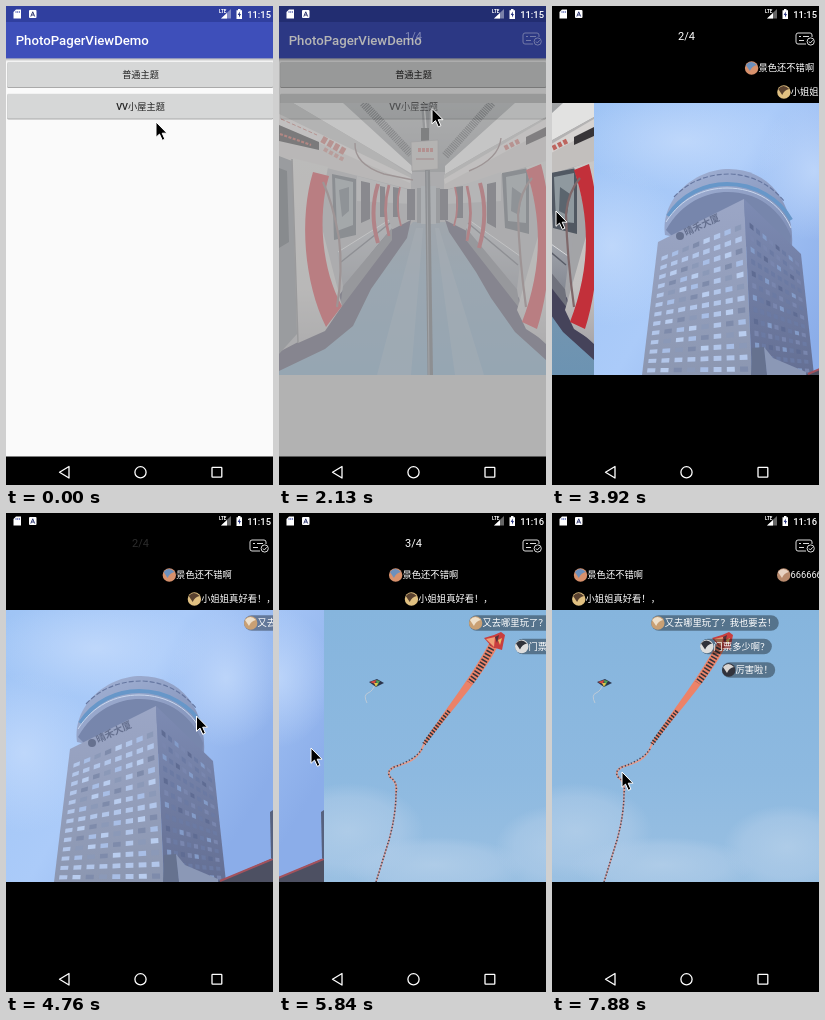
Recreate the animation shown at these times as an HTML page. Size 267 by 479 pixels, loop 8 s.

```html
<!DOCTYPE html>
<html lang="zh">
<head>
<meta charset="utf-8">
<title>PhotoPagerViewDemo</title>
<style>
html, body { margin: 0; width: 100%; height: 100%; overflow: hidden; background: #000; }
#stage { display: block; width: 100vw; height: 100vh; }
text { font-family: Roboto, "Noto Sans CJK SC", "Noto Sans CJK", sans-serif; }
</style>
</head>
<body>
<svg id="stage" viewBox="0 0 267 479">
  <defs>
    <linearGradient id="drop" x2="0" y2="1"><stop stop-color="#777" stop-opacity=".55"/><stop offset="1" stop-color="#aaa" stop-opacity="0"/></linearGradient>
    <linearGradient id="floor" x2="0" y2="1"><stop stop-color="#8494a4"/><stop offset=".35" stop-color="#7896ae"/><stop offset="1" stop-color="#6c93b2"/></linearGradient>
    <linearGradient id="ceil" x2="0" y2="1"><stop stop-color="#a2a4a6"/><stop offset="1" stop-color="#85888c"/></linearGradient>
    <linearGradient id="panel" x2="0" y2="1"><stop stop-color="#c9c7c5"/><stop offset=".7" stop-color="#c3c1c0"/><stop offset="1" stop-color="#a9a7aa"/></linearGradient>
    <linearGradient id="seat" x2="0" y2="1"><stop stop-color="#aeb1b7"/><stop offset="1" stop-color="#858993"/></linearGradient>
    <linearGradient id="skyA" x2="1" y2=".6"><stop stop-color="#9fc4f5"/><stop offset=".5" stop-color="#abcbf9"/><stop offset="1" stop-color="#8bade9"/></linearGradient>
    <linearGradient id="skyB" x2="0" y2="1"><stop stop-color="#86b5dd"/><stop offset=".6" stop-color="#8db9e0"/><stop offset="1" stop-color="#9ac0e2"/></linearGradient>
    <linearGradient id="front" x2="0" y2="1"><stop stop-color="#9ba6c6"/><stop offset="1" stop-color="#8c97b1"/></linearGradient>
    <linearGradient id="side" x2="0" y2="1"><stop stop-color="#7d8bb3"/><stop offset="1" stop-color="#646f93"/></linearGradient>
    <linearGradient id="drum" y2="1"><stop stop-color="#a3b3d6"/><stop offset="1" stop-color="#7d8cb4"/></linearGradient>
    <radialGradient id="cloud"><stop stop-color="#c6dcfc" stop-opacity=".75"/><stop offset="1" stop-color="#c6dcfd" stop-opacity="0"/></radialGradient>
    <radialGradient id="haze"><stop stop-color="#b4cfe9" stop-opacity=".8"/><stop offset=".7" stop-color="#aecbe8" stop-opacity=".55"/><stop offset="1" stop-color="#aecbe8" stop-opacity="0"/></radialGradient>
  </defs>

  <g id="home">
    <path fill="#fafafa" d="M0 0H267V451H0Z"/>
    <path fill="#303f9f" d="M0 0H267V16H0Z"/>
    <path fill="#3e4fba" d="M0 16H267V52.5H0Z"/>
    <path fill="url(#drop)" d="M0 52.5H267V56H0Z"/>
    <text x="9.7" y="39" font-size="13.2" font-weight="500" fill="#fff">PhotoPagerViewDemo</text>
    <g fill="#aaa"><rect x="1.2" y="56.8" width="266" height="25.2" rx="1.3"/><rect x="1.2" y="88.6" width="266" height="25" rx="1.3"/></g>
    <g fill="#d6d7d7"><rect x="1.2" y="56" width="266" height="25" rx="1.3"/><rect x="1.2" y="87.8" width="266" height="24.8" rx="1.3"/></g>
    <g font-size="9.2" font-weight="500" fill="#222" text-anchor="middle"><text x="134.5" y="72">普通主题</text><text x="134.5" y="103.5">VV小屋主题</text></g>
  </g>

  <path id="shade" d="M0 0H267V451H0Z"/>
  <g id="viewer">
    <svg class="page" y="97" width="267" height="272" viewBox="0 97 267 272">
      <path fill="#a3a4a7" d="M0 97H267V369H0Z"/>
      <path fill="url(#ceil)" d="M62 97H238L166 166H132Z"/>
      <path fill="#e2e2e1" d="M14 97H64L133 160V168L100 148ZM267 97H236L166 160V168L204 146 267 111Z"/>
      <path fill="#b4b3b3" d="M0 97H14L100 148 132 169V175L0 112ZM267 111L204 146 165 169V176L267 119Z"/>
      <g fill="none" stroke="#4c4f53" stroke-width="8" stroke-dasharray="1.2 .9"><path d="M84 97L132 148"/><path d="M213 97L166 150"/></g>
      <path fill="#c2bfbd" d="M0 108L132 172V186L48 163 0 152ZM267 113L165 173V186L250 160 267 156Z"/>
      <path fill="#d6d3d1" d="M0 108L132 172 131 177 0 119ZM267 113L165 173 166 178 267 124Z"/>
      <path fill="#29272a" d="M0 119L40 136V144L0 135Z"/>
      <path stroke="#b4473d" stroke-width="2" stroke-dasharray="3 1.5" d="M1 128L32 139"/>
      <path fill="none" stroke="#b9655f" stroke-width="1" stroke-dasharray="4 2" d="M2 113L38 129"/>
      <path fill="none" stroke="#bd655f" stroke-width="7" stroke-dasharray="5 2" d="M43 133L66 146"/>
      <path fill="none" stroke="#c07d78" stroke-width="4" stroke-dasharray="4 2" d="M45 143L65 154"/>
      <path fill="#373437" d="M267 121L247 131V139L267 130Z"/>
      <path stroke="#bd655f" stroke-width="5" stroke-dasharray="4 2" d="M240 135L224 143"/>
      <path fill="#a3a4a8" d="M48 162L134 184V220L62 300ZM252 160L166 184V220L240 300Z"/>
      <path fill="#b9babc" d="M78 170L134 185V198L78 195ZM222 166L166 185V198L222 195Z"/>
      <path fill="#515862" d="M53 168L77 173V229L55 234ZM223 167L250 162V228L226 222Z"/>
      <path fill="#8f999f" d="M56 172L74 176V219L58 225ZM227 171L247 167V217L229 215Z"/>
      <g fill="#5b656e"><path d="M60 184L70 181V205L63 211ZM233 181L243 188 240 209 232 205Z"/></g>
      <path fill="#4c4d58" d="M82 175L91 177V213L82 217ZM101 180L106 181V211H101ZM114 181L120 182V211H114ZM128 183H136V214H128ZM161 183H169V214H161ZM177 181L184 180V212H177ZM208 178L217 176V222L208 217Z"/>
      <path fill="url(#floor)" d="M134 216H166L267 349V369H0V360Z"/>
      <g fill="#a3b2be" opacity=".35"><path d="M137 222L144 222 132 369H98Z"/><path d="M156 222L160 222 205 369H176Z"/></g>
      <path fill="#45435a" d="M132 214L108 226 58 292 42 324 0 346V365L46 343 74 320 92 283 128 232ZM166 214L190 226 240 292 247 320 267 338V354L236 326 212 292 197 266 170 226Z"/>
      <path fill="url(#seat)" d="M58 246L110 214 113 222 64 280ZM242 250L190 214 187 222 238 283Z"/>
      <path fill="#6f717c" d="M64 280L113 222V234L61 303ZM238 283L187 222V234L241 303Z"/>
      <path fill="none" stroke="#d9dadc" d="M59 246L110 214M241 250L190 214"/>
      <path fill="none" stroke="#5a5d68" stroke-width="1.500" d="M62 256L111 217M239 259L189 217"/>
      <path fill="#777b82" d="M0 150L13 155 18 328 0 348Z"/>
      <path fill="#495058" d="M0 162L8 165 10 236 0 242Z"/>
      <path fill="url(#panel)" d="M13 152L49 161 40 210 63 300 46 325 19 337Z"/>
      <path fill="url(#panel)" d="M267 155L247 161 262 220 238 304 247 323 267 336Z"/>
      <path fill="none" stroke="#76777b" stroke-width="1.500" d="M13 153L19 337"/>
      <path fill="#c2303a" d="M34 166L50 170C38 210 43 264 63 300L47 321C25 276 20 212 34 166Z"/>
      <path fill="#c2303a" d="M247 164L262 158C275 205 274 272 258 323L243 316C263 264 264 214 247 164Z"/>
      <g fill="none" stroke="#b03d46"><path stroke-width="4" d="M99 178Q90 207 99 237M201 177Q210 208 200 242"/><path stroke-width="2.8" d="M110 179Q103 204 110 230M188 180Q195 206 188 235"/><path stroke-width="1.8" d="M121 181Q116 200 122 220M176 181Q181 200 175 220"/></g>
      <g fill="none" stroke="#7f686a" stroke-width="2.2"><path d="M44 176Q54 198 60 232Q64 264 58 301M253 172Q241 186 239 208Q240 250 247 301"/><path stroke-width="1.4" d="M76 137Q75 158 105 168L134 174M222 132Q220 153 190 165"/></g>
      <path fill="#6c6e73" d="M142 97H151L150 136H145Z"/><path stroke="#c5c6c7" stroke-width="1.500" d="M145 97L147 122"/>
      <path fill="#777a82" d="M138 182H161V217H138Z"/>
      <path fill="#a4abb2" d="M142 180H157V218H142Z"/>
      <path fill="#343539" d="M142 122H150V135H142Z"/>
      <path fill="#b7b3b1" stroke="#858587" stroke-width=".7" d="M132 136L159 134V163L133 165Z"/>
      <path stroke="#b35f5c" stroke-width="4" stroke-dasharray="3 1" d="M139 144H154"/><path stroke="#a3817f" stroke-width="2" d="M137 153H155"/>
      <path fill="#555a63" d="M146 164H151L154 369H148.500Z"/><path stroke="#8b9199" d="M148 165L150 369"/>
    </svg>

    <svg class="page" y="97" width="267" height="272" viewBox="0 97 267 272">
      <path fill="url(#skyA)" d="M0 97H267V369H0Z"/>
      <g fill="url(#cloud)"><ellipse cx="90" cy="135" rx="110" ry="50"/><ellipse cx="18" cy="240" rx="72" ry="80"/><ellipse cx="220" cy="165" rx="56" ry="70"/></g>
      <path fill="url(#drum)" d="M71 229C66 194 99 163 135 163C174 163 201 196 198 242L180 244 90 233Z"/>
      <path fill="#7786ac" d="M72 224C88 196 112 186 134 186C162 186 186 202 197 230L196 243 150 210 84 236Z"/>
      <path fill="none" stroke="#6797c9" stroke-width="4" d="M74 210C88 188 111 178 133 178C161 178 186 193 197 214"/>
      <path fill="none" stroke="#c9d7ee" d="M72 216C87 192 110 182 133 182C161 182 186 196 197 222"/>
      <path fill="none" stroke="#6677a1" stroke-width="1.200" stroke-dasharray="5 2" d="M80 191C97 173 117 168 137 168C158 169 177 179 190 195"/>
      <path fill="url(#front)" d="M64 236L150 193 158 369H48Z"/>
      <path fill="url(#side)" d="M150 193L207 248 220 369H158Z"/>
      <g id="panes"></g>
      <circle cx="86" cy="230" r="4" fill="#66718f"/>
      <text x="92" y="230" font-size="9.500" font-weight="700" fill="#65708f" transform="rotate(-25 92 230)">晴禾大厦</text>
      <path fill="#66728f" d="M158 342L170 341 173 369H157Z"/><path fill="#8b98b6" d="M170 341L179 352 212 366V369H173Z"/>
      <path fill="#4d5062" d="M212 369L267 345V369Z"/><path stroke="#a3525d" stroke-width="2" d="M214 368L267 346"/>
      <path fill="#56617e" d="M264 299L267 297V346L265 345Z"/>
    </svg>

    <svg class="page" y="97" width="267" height="272" viewBox="0 97 267 272">
      <path fill="url(#skyB)" d="M0 97H267V369H0Z"/>
      <g fill="url(#haze)"><ellipse cx="24" cy="318" rx="76" ry="48"/><ellipse cx="110" cy="352" rx="92" ry="28"/><ellipse cx="235" cy="334" rx="64" ry="42"/></g>
      <path fill="none" stroke="#c9ced5" stroke-width=".8" d="M51 171Q49 178 44 180T43 190"/>
      <path fill="#2b344b" d="M45 169L53 166 60 170 52 174Z"/><path fill="#d54d41" d="M46 169L52 167 51 171Z"/><path fill="#54a05a" d="M52 167L56 168 53 173Z"/><path fill="#e2c34b" d="M50 170L54 170 52 174Z"/>
      <path fill="#ec8268" d="M167 127L175 131C158 164 135 188 101 232L99 230C123 194 147 165 167 127Z"/>
      <g fill="none" stroke="#33343c"><path stroke-width="6.500" stroke-dasharray="1.6 1.8" d="M169 132Q158 153 146 170"/><path stroke-width="4" stroke-dasharray="1.5 1.6" d="M125 198Q112 214 100 231"/></g>
      <g fill="none"><path stroke="#e39a8c" stroke-width="2" d="M100 231Q96 242 88 247Q81 251 70 254Q62 258 66 264Q74 269 72 280"/><path stroke="#d59a98" stroke-width="1.500" d="M72 280Q72 302 65 327L52 369"/><path stroke="#40475a" stroke-width="1.500" stroke-dasharray="1.3 2" d="M98 236Q92 246 70 254Q62 258 66 264Q74 269 72 280Q72 302 65 327L52 369"/></g>
      <path fill="#c93e3e" d="M160 125L170 122 177 119 181 122 178 137 168 134Z"/>
      <path fill="#f0a078" d="M162 126L171 124 170 134Z"/><path fill="#54323a" d="M171 124L175 122 173 130Z"/><path fill="#e7bf65" d="M174 127L178 125 176 132Z"/>
    </svg>

    <g id="bullets"></g>
    <text id="count" x="134.5" y="34" font-size="11" fill="#fff" text-anchor="middle"></text>
    <g fill="none" stroke="#ddd"><path d="M254 38H246Q244 38 244 36V29Q244 27 246 27H258Q260 27 260 29V31"/><path d="M247 30.500H249M251 30.500H257M247 34.500H252"/><circle cx="258.700" cy="35.500" r="3.600"/><path d="M257 35.500L258.300 37 260.700 34.300"/></g>
  </g>

  <g fill="#fff">
    <path d="M10 3.500H15V12.500H7.500V6Z"/><path stroke="#5362b0" stroke-width=".8" d="M10 5V7M11.700 5V7M13.400 5V7"/>
    <rect x="23" y="4" width="7.500" height="8" rx="1"/><path fill="none" stroke="#222b66" stroke-width=".9" d="M24.800 10.500L26.750 5.800 28.700 10.500M25.500 9H28"/>
    <path opacity=".4" d="M225 3V12.500H215Z"/><path d="M221 7V12.500H215Z"/><text x="213" y="7" font-size="4.600" font-weight="700">LTE</text>
    <path d="M230.500 4.200H232V3H234.500V4.200H236V13H230.500Z"/><path fill="#28347f" d="M233.800 5.500L231.700 9H233V11.500L235 8H233.800Z"/>
    <text id="clock" x="265" y="11.700" font-size="9.400" font-weight="500" text-anchor="end"></text>
  </g>
  <path d="M0 450.500H267V479H0Z"/>
  <g fill="none" stroke="#fff" stroke-width="1.300"><path stroke-linejoin="round" d="M63 460.500V472L53.500 466.250Z"/><circle cx="134.500" cy="466.300" r="5.600"/><rect x="206" y="461.300" width="9.800" height="9.800" rx=".6"/></g>
  <path id="cursor" stroke="#fff" stroke-width="1" d="M0 0V15.300L3.500 12.100 6.300 18.300 8.900 17.200 6.200 11.200H11Z"/>
</svg>
<script>
const $ = id => document.getElementById(id);
const pages = [...document.querySelectorAll('.page')];
const LOOP = 8000, W = 267;

// text, centre y, x at time at, speed in px/ms, avatar tones
const bullets = [
  ['景色还不错啊', 62, 224, 3200, .0432, '#d8916c', '#6c90bd'],
  ['小姐姐真好看！，', 86, 262.500, 3200, .0518, '#e0c081', '#59412f'],
  ['又去哪里玩了？我也要去！', 110, 238, 4760, .0445, '#c9a074', '#eee0cb'],
  ['门票多少啊？', 133.500, 236, 5840, .0431, '#dedede', '#30323a'],
  ['厉害啦！', 157, 170, 7880, .0545, '#32333c', '#d9d5d2'],
  ['666666', 62, 225, 7880, .0510, '#b88a6d', '#e7d2c2']
];
$('bullets').innerHTML = bullets.map(([text, y, , , , a, b]) => {
  const w = 16 + 9.3 * text.length * (text[0] === '6' ? .57 : 1);
  return `<g><rect y="${y - 7.8}" width="${w}" height="15.6" rx="7.8" fill-opacity=".37"/>
    <circle cx="6.7" cy="${y}" r="6.7" fill="${a}"/>
    <path d="M1 ${y - 3}Q6 ${y - 9} 12 ${y - 3}Q7 ${y - 2} 5 ${y + 3}Z" fill="${b}"/>
    <text x="13.5" y="${y + 3.4}" font-size="9.3" fill="#fff">${text}</text></g>`;
}).join('');
const bulletEls = [...$('bullets').children];

// window grid on a wall given by its four corners
function panes(a, b, c, d, cols, rows, tones) {
  const mix = (p, q, k) => [p[0] + (q[0] - p[0]) * k, p[1] + (q[1] - p[1]) * k];
  const at = (u, v) => mix(mix(a, b, u), mix(d, c, u), v).map(n => n.toFixed(1)).join(' ');
  let out = '';
  for (let r = 0; r < rows; r++) for (let i = 0; i < cols; i++) {
    const u = (i + .2) / cols, U = (i + .8) / cols, v = (r + .28) / rows, V = (r + .72) / rows;
    const tone = tones[(i * 7 + r * 5 + i * r * 3) % tones.length];
    out += `<path fill="${tone}" d="M${at(u, v)}L${at(U, v)} ${at(U, V)} ${at(u, V)}Z"/>`;
  }
  return out;
}
$('panes').innerHTML =
  panes([66, 249], [149, 214], [157, 369], [50, 369], 8, 13, ['#b2c6ea', '#7e8bab', '#a8bee6', '#b9cdef', '#8b99b8']) +
  panes([154, 212], [206, 256], [217, 369], [161, 369], 8, 13, ['#5f6c93', '#7986ae', '#839bc8', '#6b7aa3']);

// eased track through [time, value, value...] keys
function track(keys, t) {
  let i = 0;
  while (i < keys.length - 1 && keys[i + 1][0] <= t) i++;
  const a = keys[i], b = keys[i + 1];
  if (!b || t <= a[0]) return a.slice(1);
  const k = (t - a[0]) / (b[0] - a[0]), e = k * k * (3 - 2 * k);
  return a.slice(1).map((v, j) => v + (b[j + 1] - v) * e);
}
const cursorKeys = [
  [0, 150, 116], [120, 150, 116], [810, 153, 102.500], [2360, 153, 102.500], [3200, 190, 138],
  [3440, 229, 198], [3920, 4, 205], [4080, 4, 205], [4640, 190, 203], [4880, 191, 203],
  [5360, 245, 205], [5480, 250, 206], [5840, 32, 235], [6200, 32, 235], [6800, 70, 259]
];
const scrollKeys = [[3440, 0], [3920, 225], [4160, 267], [5480, 267], [5840, 489], [6080, 534]];
// backdrop and content opacity
const fadeKeys = [[2130, .29, .4], [2360, 1, 1]];
const countKeys = [
  [2480, 1], [2960, 0], [3439, 0], [3440, 1], [4360, 1], [4900, 0],
  [5479, 0], [5480, 1], [6280, 1], [6800, 0]
];

function step(t) {
  if (t < 120) return 0;
  if (t < 2130) return Math.min(810, 120 + 115 * Math.floor((t - 120) / 115));
  return t < 2240 ? 2130 : 2240 + 120 * Math.floor((t - 2240) / 120);
}

function draw(t) {
  const [x, y] = track(cursorKeys, t);
  $('cursor').setAttribute('transform', `translate(${x} ${y})`);
  const [shade, content] = t < 2130 ? [0, 0] : track(fadeKeys, t);
  $('shade').setAttribute('opacity', shade);
  $('viewer').setAttribute('opacity', content);
  const [scroll] = track(scrollKeys, t);
  pages.forEach((p, i) => p.setAttribute('x', i * W - scroll));
  $('count').textContent = `${1 + Math.round(scroll / W)}/4`;
  $('count').setAttribute('opacity', track(countKeys, t)[0]);
  $('clock').textContent = t < 5600 ? '11:15' : '11:16';
  bullets.forEach(([, , x0, at, v], i) =>
    bulletEls[i].setAttribute('transform', `translate(${x0 - v * (t - at)} 0)`));
}
function loop() {
  draw(step(performance.now() % LOOP));
  requestAnimationFrame(loop);
}
loop();
</script>
</body>
</html>
```
